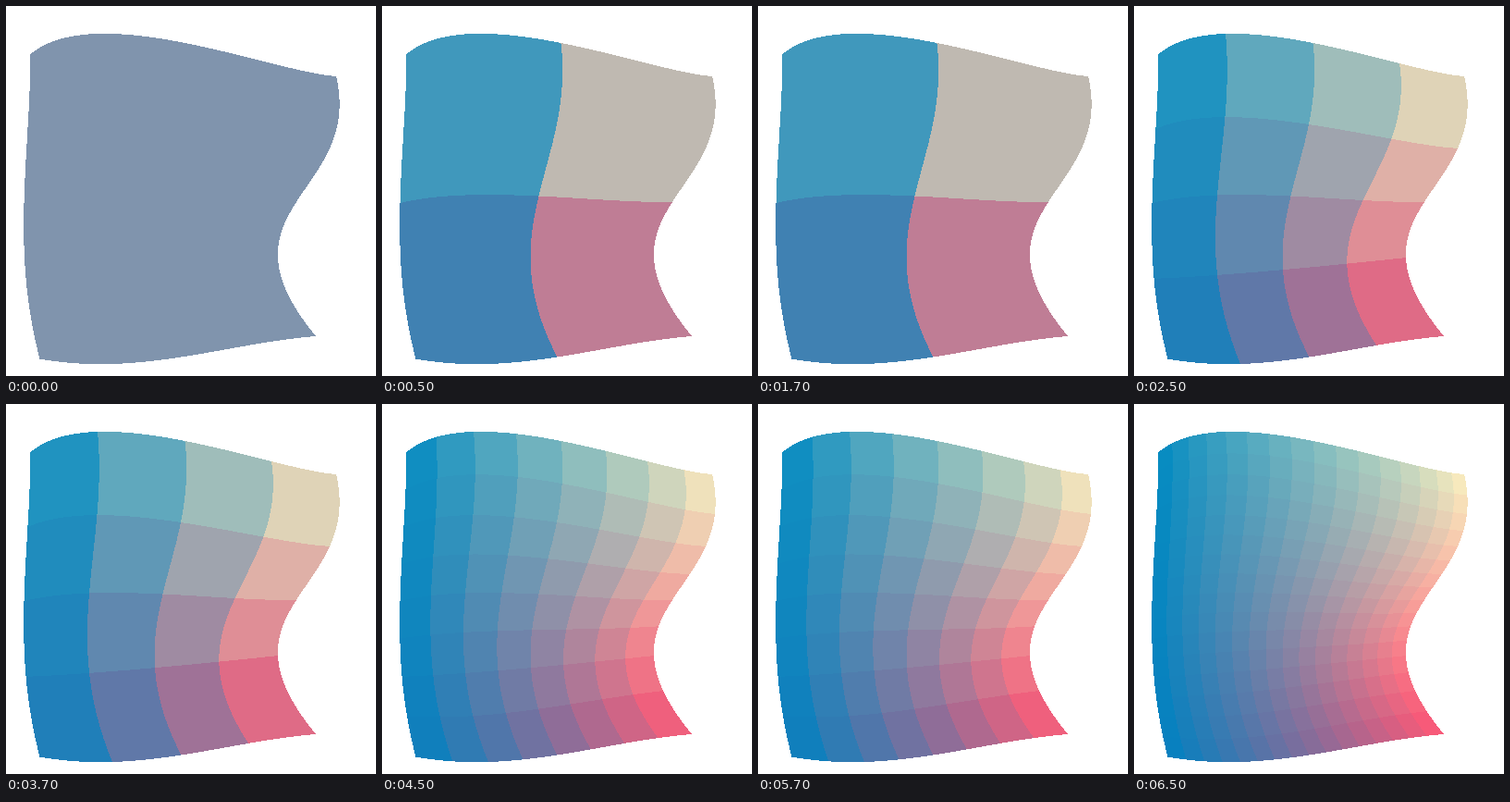
An HTML page for the animation above (8000 ms loop, 400x400 px).

```html
<!DOCTYPE html>
<html lang="en">
<head>
<meta charset="utf-8">
<title>Coons patch subdivision</title>
<style>
  html, body { margin: 0; width: 100%; height: 100%; overflow: hidden; background: #fff; }
  svg { display: block; width: 100vw; height: 100vh; }
</style>
</head>
<body>
<svg id="stage" viewBox="0 0 400 400" shape-rendering="crispEdges"></svg>
<script>
const LOOP = 8000;
const STARTS = [0, 500, 2500, 4500, 6500];
const SAMPLES = 64; // curve samples across the whole patch

// Boundary curves as cubic control points
const TOP = [[26.5, 52], [98.4, -7.6], [289.6, 71.6], [357, 76]];
const BOTTOM = [[36.5, 381.5], [144.8, 400.9], [236.7, 364.9], [335, 357]];
const LEFT = [TOP[0], [26, 162], [5, 261.5], BOTTOM[0]];
const RIGHT = [TOP[3], [387, 203], [219.6, 217.5], BOTTOM[3]];

// Corner colours: top left, top right, bottom left, bottom right
const COLORS = [[0, 137, 193], [255, 241, 191], [0, 129, 193], [255, 84, 116]];

const mix = (a, b, t) => a + (b - a) * t;

const bilinear = (a, b, c, d, u, v, i) =>
  mix(mix(a[i], b[i], u), mix(c[i], d[i], u), v);

function cubic(p, t, i) {
  const s = 1 - t;
  return s * s * s * p[0][i] + 3 * s * s * t * p[1][i] +
    3 * s * t * t * p[2][i] + t * t * t * p[3][i];
}

function coons(u, v) {
  return [0, 1].map(i =>
    mix(cubic(TOP, u, i), cubic(BOTTOM, u, i), v) +
    mix(cubic(LEFT, v, i), cubic(RIGHT, v, i), u) -
    bilinear(TOP[0], TOP[3], BOTTOM[0], BOTTOM[3], u, v, i));
}

function color(u, v) {
  const rgb = [0, 1, 2].map(i => Math.round(bilinear(...COLORS, u, v, i)));
  return `rgb(${rgb})`;
}

function cellPath(col, row, n) {
  const steps = SAMPLES / n;
  const points = [];
  const add = (x, y) =>
    points.push(coons((col + x) / n, (row + y) / n).map(c => c.toFixed(2)).join(" "));
  for (let k = 0; k < steps; k++) add(k / steps, 0);
  for (let k = 0; k < steps; k++) add(1, k / steps);
  for (let k = steps; k > 0; k--) add(k / steps, 1);
  for (let k = steps; k > 0; k--) add(0, k / steps);
  return `M${points.join("L")}Z`;
}

function mesh(level) {
  const n = 2 ** level;
  let out = "";
  for (let row = 0; row < n; row++) {
    for (let col = 0; col < n; col++) {
      const fill = color((col + 0.5) / n, (row + 0.5) / n);
      out += `<path d="${cellPath(col, row, n)}" fill="${fill}"/>`;
    }
  }
  return out;
}

const stage = document.getElementById("stage");
const meshes = STARTS.map((_, level) => mesh(level));
let shown = -1;

function draw(time) {
  const t = time % LOOP;
  const level = STARTS.filter(start => t >= start).length - 1;
  if (level === shown) return;
  stage.innerHTML = meshes[level];
  shown = level;
}

const begin = performance.now();
function tick() {
  draw(performance.now() - begin);
  requestAnimationFrame(tick);
}
tick();
</script>
</body>
</html>
```
